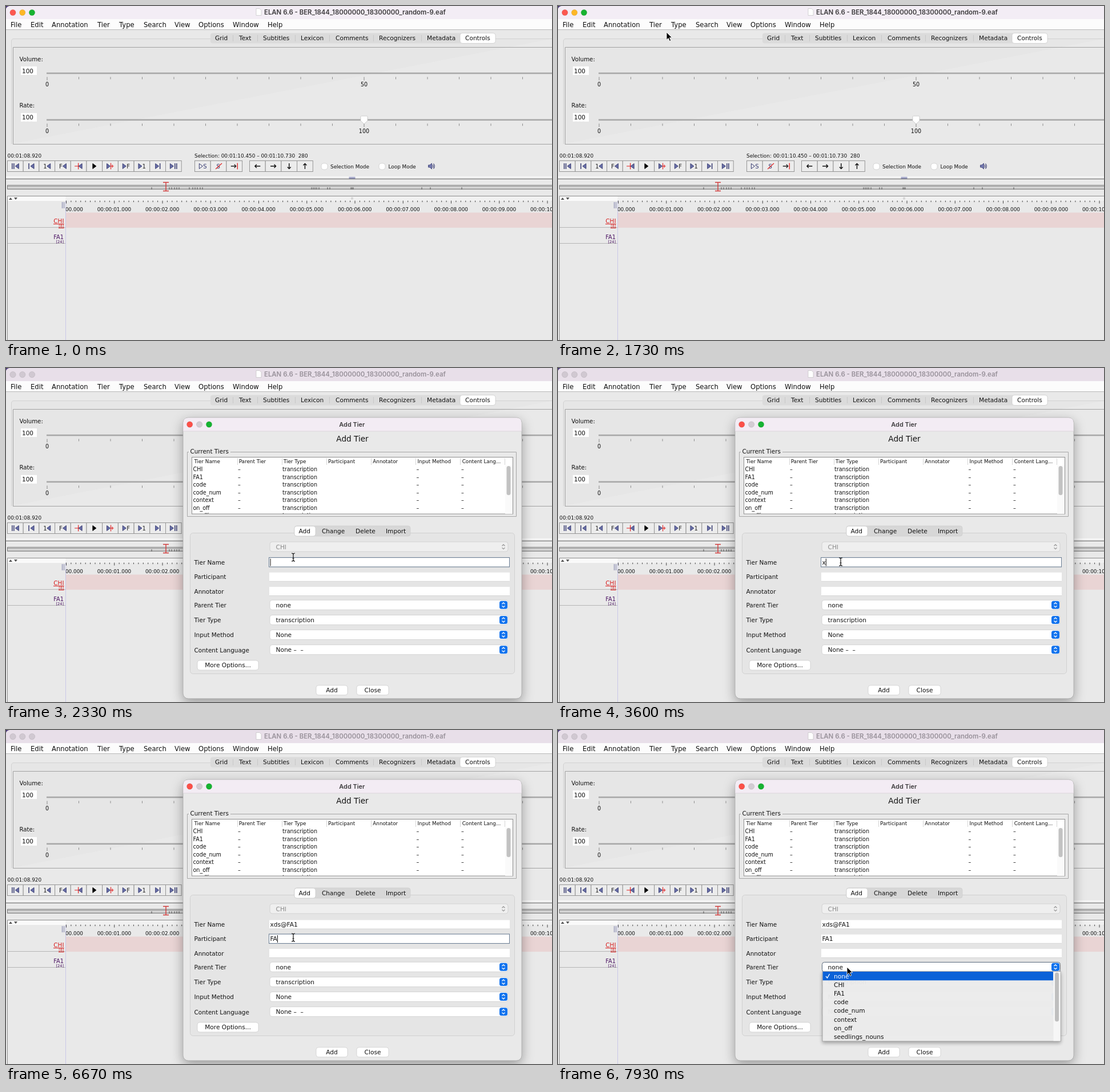
Write an HTML page that moves like this. It is 956 by 586 pixels and loops after 8 s.

```html
<!DOCTYPE html>
<html lang="en">
<head>
<meta charset="utf-8">
<title>Add a tier</title>
<style>
  html, body { margin: 0; width: 100%; height: 100%; overflow: hidden; background: #e9e9e9; }
  svg { display: block; width: 956px; height: 586px; }
  text { font-family: "DejaVu Sans", sans-serif; white-space: pre; }
  .title { font-family: Inter, Roboto, sans-serif; font-weight: 600; }
  .mid { text-anchor: middle; }
  .end { text-anchor: end; }

  .step, .step-move { animation: 8s step-end infinite; }
  .menu { animation-name: menu; }
  .hover { animation-name: hover; }
  .inactive { animation-name: inactive; }
  .dialog { animation-name: dialog; transform-origin: 606.5px 333.5px; filter: drop-shadow(0 7px 10px #0005); }
  .content { animation-name: content; }
  .popup { animation-name: popup; }
  .arrow { animation-name: arrow; }
  .beam { animation-name: beam; }
  .pointer { animation: pointer 8s ease-in-out infinite; }

  @keyframes menu { 0% { visibility: hidden } 13.375% { visibility: visible } 20.875%, to { visibility: hidden } }
  @keyframes hover { 0% { visibility: hidden } 15.85% { visibility: visible } 20.875%, to { visibility: hidden } }
  @keyframes inactive { 0% { visibility: hidden } 22.5%, to { visibility: visible } }
  @keyframes dialog {
    0% { visibility: hidden; transform: scale(.93); opacity: .7 }
    22.5% { visibility: visible; transform: scale(.93); opacity: .7 }
    23.375% { visibility: visible; transform: scale(.99); opacity: 1 }
    24.125%, to { visibility: visible; transform: none; opacity: 1 }
  }
  @keyframes content { 0% { visibility: hidden } 25%, to { visibility: visible } }
  @keyframes popup { 0% { visibility: hidden } 97.5%, to { visibility: visible } }
  @keyframes arrow {
    0% { visibility: hidden } 2.5% { visibility: visible }
    28.75% { visibility: hidden } 93.5%, to { visibility: visible }
  }
  @keyframes beam { 0% { visibility: hidden } 28.75% { visibility: visible } 93.5%, to { visibility: hidden } }
  @keyframes pointer {
    0%, 2.5% { transform: translate(948px, 398px) }
    12.5%, 13.375% { transform: translate(175px, 33px) }
    15.85%, 24.1% { transform: translate(190px, 46px) }
    29.125% { transform: translate(503px, 332px) }
    34.1%, 70.8% { transform: translate(495px, 340px) }
    77%, 91.6% { transform: translate(503px, 364px) }
    96%, to { transform: translate(506px, 416px) }
  }
</style>
</head>
<body>
<svg id="stage" viewBox="0 0 956 586"></svg>
<script>
const BLUE = '#0b62d8', NAVY = '#34386f', INK = '#111';

const text = (x, y, s, size = 10.6, attrs = '') =>
  `<text x="${x}" y="${y}" font-size="${size}" fill="${INK}" ${attrs}>${s}</text>`;
const fill = c => `style="fill:${c}"`;
const rect = (x, y, w, h, color, attrs = '') =>
  `<rect x="${x}" y="${y}" width="${w}" height="${h}" fill="${color}" ${attrs}/>`;
const path = (d, color, width = 1, inside = 'none') =>
  `<path d="${d}" stroke="${color}" stroke-width="${width}" fill="${inside}"/>`;
const pill = (x, y, w, h, color = '#fff') =>
  rect(x, y, w, h, color, 'rx="4" stroke="#c9c9c9" stroke-width=".7"');
const each = (n, f) => Array.from({ length: n }, (_, i) => f(i)).join('');
const group = (name, body) => `<g class="${name}">${body}</g>`;
const lights = (x, y, gap, colors) => colors.map((c, i) =>
  `<circle cx="${x + gap * i}" cy="${y}" r="5.2" fill="${c}" stroke="#0002" stroke-width=".6"/>`).join('');

// Main window

function titleBar(bg, colors, ink) {
  return rect(0, 0, 956, 23, bg) + path('M0 0V5Q1 1 6 0z', 'none', 0, '#4b3a78') +
    lights(12, 11.5, 16.75, colors) +
    path('M438 4.5h6l3 3v9h-9z', '#bbb', .6, '#fff') +
    text(452, 15, 'ELAN 6.6 - BER_1844_18000000_18300000_random-9.eaf', 11.4, `class="title" ${fill(ink)}`);
}

function menuBar() {
  const items = { File: 8, Edit: 43, Annotation: 80, Tier: 160, Type: 198, Search: 241, View: 295, Options: 337, Window: 397, Help: 458 };
  return rect(0, 23, 956, 18, '#fcfcfc') + rect(0, 41, 956, 1, '#b8b8b8') +
    Object.entries(items).map(([s, x]) => text(x, 36.8, s, 11.6)).join('');
}

function tabs() {
  const items = { Grid: 366, Text: 408, Subtitles: 450, Lexicon: 516, Comments: 577, Recognizers: 653, Metadata: 737 };
  return path('M956 57.5H14Q9.5 57.5 9.5 62V242', '#d2d2d2', 1, '#e6e6e6') +
    path('M12.5 242.5V72.5H956M12 242.5H956', '#a2a2a2') +
    rect(358, 47.5, 499, 18, '#dbdbdb', 'rx="4"') +
    [397, 440, 506, 566, 643, 727].map(x => rect(x, 51, 1, 11, '#c8c8c8')).join('') +
    Object.entries(items).map(([s, x]) => text(x, 60.3, s)).join('') +
    pill(795, 47.5, 62, 18) + text(804, 60.3, 'Controls');
}

function slider(y, label, middle) {
  return text(23.5, y - 21.5, label, 10.2) +
    rect(26, y - 12, 28, 15, '#fff') + text(28, y - .5, '100', 10.5) +
    rect(71, y - 1.3, 885, 2.6, '#a8a8a8') +
    each(16, i => rect(71.5 + 55.5 * i, y + 6.5, 1, i % 10 ? 4 : 6, '#8a8a8a')) +
    text(72, y + 23.3, '0', 9.6, 'class="mid"') + text(627, y + 23.3, middle, 9.6, 'class="mid"');
}

const triangle = (x, dir, color = '#696fa8', edge = NAVY) =>
  path(dir < 0 ? `M${x + 6} -4.5V4.5L${x} 0z` : `M${x} -4.5V4.5L${x + 6} 0z`, edge, .9, color);
const bar = (x, color = NAVY) => path(`M${x} -5V5`, color, 1.5);
const glyph = (x, s, color = '#222') => text(x, 3.8, s, 10, fill(color));

const transport = [
  bar(-5.5) + bar(-2.5) + triangle(0, -1),
  bar(-4) + triangle(-1, -1),
  glyph(-6.5, '1') + triangle(0, -1),
  glyph(-6.5, 'F') + triangle(0, -1),
  path('M-7 0H0M-.5 -5.5V5.5', '#e02020', 1.2) + triangle(0, -1),
  triangle(-3, 1, '#000', '#000'),
  triangle(-6, 1) + path('M1 -5.5V5.5M1 0H6M3.7 -2.5V2.5', '#e02020', 1.1),
  triangle(-6, 1) + glyph(1, 'F'),
  triangle(-6, 1) + glyph(.5, '1'),
  triangle(-4, 1) + bar(4),
  triangle(-6, 1) + bar(2.5) + bar(5.5)
];
const selection = [
  path('M-6 -4.5V4.5L0 0z', NAVY) + glyph(1, 'S', NAVY),
  glyph(-3.5, 'S', NAVY) + path('M-5 5L6 -5', '#e02020', 1.1),
  path('M-6 0H3M0 -3L3 0L0 3', '#222', 1.3) + path('M5.5 -5.5V5.5', '#e02020', 1.3)
];
const turns = [180, 0, 90, -90].map(a =>
  `<g transform="rotate(${a})">${path('M-5 0H4.5M1.5 -3L4.5 0L1.5 3', '#111', 1.4)}</g>`);

const buttons = (x, icons) => icons.map((icon, i) =>
  rect(x + 27.7 * i, 271.5, 27.7, 19, '#ececec', 'stroke="#959595"') +
  `<g transform="translate(${x + 13.85 + 27.7 * i} 281)">${icon}</g>`).join('');

function controls() {
  return text(2.5, 265.5, '00:01:08.920', 8.9) +
    text(330, 265.5, 'Selection: 00:01:10.450 – 00:01:10.730  280', 8.9) +
    buttons(2.5, transport) + buttons(330.5, selection) + buttons(426.5, turns) +
    pill(552, 276, 11, 11) + text(568, 284.8, 'Selection Mode', 8.9) +
    pill(653, 276, 11, 11) + text(669.5, 284.8, 'Loop Mode', 8.9) +
    path('M739.5 279h2.5l3.5-3v10l-3.5-3h-2.5z', NAVY, .8, '#7479b0') +
    path('M747 278.5q2 2.5 0 5M748.5 276.5q3.5 4.5 0 9', NAVY, 1.1);
}

function overview() {
  const marks = [255, 286, 290, 295, 299, 303, 321, 327, 331, 335, 340, 344, 535, 538, 541, 544, 548, 563, 567, 604, 606, 608, 728, 743, 798];
  return rect(0, 299, 956, 1.5, '#fafafa') + rect(0, 303, 956, 1, '#6a6a6a') +
    path('M600.5 300.5h11M600.5 302.5h11', '#6a6ea8') +
    path('M956 314.5H2.5V321.5H956M3 316.5H956', '#777') + path('M3 319.5H956', '#a0a0a0') +
    marks.map(x => rect(x - .5, 318, 1, 4, '#555')).join('') +
    path('M275 309.5h10M280 309.5v15M275 324.5h10', '#d03a3a', 1.4);
}

function timeline() {
  return path('M956 333.5H2.5V586', '#8c8c8c') +
    rect(3, 334, 953, 8, '#f1f1f1') + rect(3, 334, 101, 8, '#fafafa') +
    path('M5 340l3-4l3 4zM14 336l3 4l3-4z', 'none', 0, '#555') +
    '<circle cx="606" cy="337.5" r="2.2" fill="#d6d6d6"/>' +
    path('M98.5 344v11M101.5 344v11', '#777ba8') +
    rect(105, 362.5, 851, 26.5, '#e9d4d4') +
    each(102, i => rect(105 + 8.425 * i, 341.5, 1, i % 10 ? 2.6 : 5, '#444')) +
    `<g clip-path="url(#ruler)">${each(11, i => text(105.2 + 84.25 * i, 360, `00:00:${String(i).padStart(2, '0')}.000`, 8.9, 'class="mid"'))}</g>` +
    path('M3 388.5H104M3 416.5H104', '#b5b5b5') + rect(104, 342, 1, 244, '#c9c7e8') +
    text(101.5, 380.5, 'CHI', 10.4, `class="end" ${fill('#d81e1e')}`) +
    text(101.5, 388.3, '[8]', 6.6, `class="end" ${fill('#d81e1e')}`) + path('M83 382.5h18.5M92 389.5h9.5', '#d81e1e') +
    text(101, 408.5, 'FA1', 9.8, `class="end" ${fill('#4a1262')}`) +
    text(101, 415.5, '[24]', 6.6, `class="end" ${fill('#4a1262')}`);
}

function tierMenu() {
  const top = ['Add New Tier...', 'Change Tier Attributes...', 'Change Parent of Tier...', 'Delete Tier...', 'Import Tiers...', 'Participant'];
  const rest = ['Tokenize Tier...', 'Filter Tier...', 'Copy Tier...', 'Copy Annotations from Tier to Tier...', 'Merge Tiers...',
    'Merge Tiers...(Classic)', 'Merge Tier Group...', 'Modify Boundaries of All Annotations...', 'Create Annotations on Dependent Tiers...',
    'Create Annotations from Overlaps...', 'Create Annotations from Overlaps... (Classic)', 'Create Annotations from Subtraction...',
    'Create Annotations from Gaps...', 'Create Regular Annotations...', 'Remove Annotations or Values...',
    'Convert Annotation Values to Tiers...', 'Label and Number Annotations...', 'Change Case of Annotations...'];
  const list = (items, y) => items.map((s, i) => text(170, y + 16 * i, s, 11.45)).join('');
  const white = fill('#fff');
  return group('step menu',
    rect(152, 23, 38, 18.5, BLUE) + text(160, 36.8, 'Tier', 11.6, white) +
    rect(152.5, 42, 298, 400, '#fcfcfc', 'opacity=".97" stroke="#b5b5b5" stroke-width=".8" style="filter:drop-shadow(0 4px 5px #0005)"') +
    list(top, 57.7) + list(rest, 163.7) +
    text(437, 57.7, '⌘T', 11.4, 'class="end"') + text(437, 105.7, '⌥⌘T', 11.4, 'class="end"') +
    path('M435 129.5v8.5l8-4.2z', 'none', 0, '#333') + rect(153, 145, 297, 1, '#d6d6d6')) +
    group('step hover', rect(153, 46, 297, 16, BLUE) +
      text(170, 57.7, top[0], 11.45, white) + text(437, 57.7, '⌘T', 11.4, `class="end" ${white}`));
}

// Dialog

function tierTable() {
  const heads = ['Tier Name', 'Parent Tier', 'Tier Type', 'Participant', 'Annotator', 'Input Method', 'Content Lang...'];
  const names = ['CHI', 'FA1', 'code', 'code_num', 'context', 'on_off', 'seedlings_nouns'];
  return path('M320 147.5H317.5V260.5H893.5V147.5H393', '#a6a6a6') + text(322.5, 150.3, 'Current Tiers', 10.4) +
    rect(325.5, 156.5, 562, 99.5, '#fff', 'stroke="#8e8e8e"') +
    heads.map((s, i) => text(329.5 + 78.2 * i, 167.2, s, 8.8) + rect(405 + 78 * i, 158, 1, 12, '#d5d5d5')).join('') +
    `<g clip-path="url(#rows)">${names.map((s, i) => {
      const y = 181.4 + 13.45 * i;
      return text(327.5, y, s, 9.6) + text(484, y, 'transcription', 9.6) +
        [406, 718.5, 797].map(x => text(x, y, '–', 9.6)).join('');
    }).join('')}</g>` +
    rect(874, 171, 13, 85, '#fafafa') + rect(876.5, 172, 7, 51, '#c2c2c2', 'rx="3.5"');
}

const chevrons = (y, color) => path(`M868.5 ${y - 1.5}l2.5-2.5l2.5 2.5M868.5 ${y + 1.5}l2.5 2.5l2.5-2.5`, color, 1.3);
const combo = (y, s) => pill(462, y - 8.5, 417, 17) + text(472.5, y + 4, s) +
  rect(864, y - 7, 14, 14, '#1273ee', 'rx="3.5"') + chevrons(y, '#fff');
const button = (x, y, w, s) => pill(x, y - 8.5, w, 17) + text(x + w / 2, y + 3.8, s, 10.6, 'class="mid"');

function tierForm() {
  const labels = ['Tier Name', 'Participant', 'Annotator', 'Parent Tier', 'Tier Type', 'Input Method', 'Content Language'];
  const rows = [341, 366.3, 391.5, 416, 442.3, 468.3, 494.5];
  const choices = ['none', 'transcription', 'None', 'None –  –'];
  return rect(322.5, 289.5, 568, 247, '#e5e5e5', 'rx="5" stroke="#d0d0d0"') +
    rect(505, 277, 203, 18, '#d7d7d7', 'rx="4" stroke="#c9c9c9" stroke-width=".6"') + pill(505, 277.5, 37, 17.5) +
    text(512.5, 290, 'Add') + text(553, 290, 'Change', 10.5) + text(612, 290, 'Delete') + text(665, 290, 'Import') +
    pill(462, 305, 417, 17, '#efefef') + text(472.5, 318, 'CHI', 10.6, fill('#8a8a8a')) + chevrons(313.7, '#9a9a9a') +
    labels.map((s, i) => text(329.5, rows[i] + 4, s, 10.45)).join('') +
    rows.slice(0, 3).map(y => rect(461, y - 7.5, 421, 15.5, '#fff') + rect(461, y + 7.5, 421, .8, '#cfcfcf')).join('') +
    choices.map((s, i) => combo(rows[3 + i] - .3, s)).join('') +
    button(335, 521.5, 107, 'More Options...') + button(543, 565.3, 55, 'Add') + button(614, 565.3, 56, 'Close') +
    rect(460.5, 332.5, 421, 16.5, 'none', 'id="focus" stroke="#6b7f95"') +
    text(462.5, 345, '', 10.6, 'id="name"') + text(462.5, 370, '', 10.6, 'id="person"') +
    rect(0, 0, 1.1, 13, '#222', 'id="caret"');
}

function parentList() {
  const items = ['none', 'CHI', 'FA1', 'code', 'code_num', 'context', 'on_off', 'seedlings_nouns'];
  return group('step popup',
    rect(462.5, 407.5, 417, 17, 'none', 'rx="4" stroke="#5f6f82"') +
    rect(463, 423.5, 417, 122.5, '#ececec', 'opacity=".97" stroke="#9a9a9a" stroke-width=".8" style="filter:drop-shadow(0 3px 3px #0005)"') +
    rect(867.5, 424, 12, 121.5, '#f6f6f6') + rect(870, 425.5, 7, 86, '#bfbfbf', 'rx="3.5"') +
    rect(463.5, 424, 403.5, 15.3, BLUE) + path('M469 432l2.5 3l4-7', '#fff', 1.3) +
    items.map((s, i) => text(483, 436 + 15.1 * i, s, 10.6, i ? '' : fill('#fff'))).join(''));
}

function dialog() {
  return group('step dialog',
    rect(310, 87, 593, 493, '#e9e9e9', 'rx="9" stroke="#a9a9a9" stroke-width=".8"') +
    path('M310.4 111V96Q310.4 87.4 319 87.4H894Q902.6 87.4 902.6 96V111z', 'none', 0, '#f3ecf4') +
    rect(310.4, 110.5, 592.2, .8, '#d8d2d8') +
    lights(321.7, 99, 16.9, ['#fb5049', '#d3ccd3', '#17b332']) +
    text(605.8, 102.5, 'Add Tier', 10.9, `class="title mid" ${fill('#3c3a3c')}`)) +
    group('step content', text(606.5, 129.3, 'Add Tier', 13.6, 'class="mid"') + tierTable() + tierForm()) +
    parentList();
}

const pointer = group('pointer',
  group('step arrow', path('M0 0V13.5L3.2 10.6L5.4 15.6L7.7 14.6L5.5 9.7H9.7z', '#fff', .9, '#000')) +
  group('step beam', path('M-3 -7Q0 -7 0 -5Q0 -7 3 -7M0 -5V5M-3 7Q0 7 0 5Q0 7 3 7M-1.5 2H1.5', '#111', 1.2)));

document.getElementById('stage').innerHTML =
  '<clipPath id="ruler"><rect x="105" y="342" width="851" height="24"/></clipPath>' +
  '<clipPath id="rows"><rect x="326" y="170" width="548" height="86"/></clipPath>' +
  rect(0, 0, 956, 586, '#e9e9e9') +
  titleBar('#f3edf5', ['#fc5850', '#fdb726', '#18b331'], '#3c3a3c') +
  group('step inactive', titleBar('#e8dfe9', Array(3).fill('#d0c8d1'), '#98919a')) +
  menuBar() + tabs() + slider(118, 'Volume:', '50') + slider(199.8, 'Rate:', '100') +
  path('M621 194.5q0-1.5 1.5-1.5h9q1.5 0 1.5 1.5v7l-6 5.5l-6-5.5z', '#c4c4c4', .8, '#fff') +
  controls() + overview() + timeline() + tierMenu() + dialog() + pointer;

// Typing: [time in ms, active field, tier name, participant]
const keys = [
  [0, 0, '', ''], [2000, 0, '', ''], [3600, 0, 'x', ''], [3930, 0, 'xd', ''], [4070, 0, 'xds', ''], [4470, 0, 'xds@', ''],
  [5065, 0, 'xds@F', ''], [5130, 0, 'xds@FA', ''], [5470, 0, 'xds@FA1', ''], [6130, 1, 'xds@FA1', ''],
  [6530, 1, 'xds@FA1', 'F'], [6665, 1, 'xds@FA1', 'FA'], [7000, 1, 'xds@FA1', 'FA1'], [7700, 2, 'xds@FA1', 'FA1']
];
const [nameBox, personBox, caret, focusRing] =
  ['name', 'person', 'caret', 'focus'].map(id => document.getElementById(id));
let start;

function frame(now) {
  start ??= now;
  const t = (now - start) % 8000;
  const [since, field, name, person] = keys.findLast(k => k[0] <= t);
  nameBox.textContent = name;
  personBox.textContent = person;
  const box = field ? personBox : nameBox, y = field ? 358 : 332.5;
  const blinkOn = Math.floor((t - since) / 500) % 2 === 0;
  caret.setAttribute('x', 462.5 + box.getComputedTextLength());
  caret.setAttribute('y', y + 2);
  caret.style.opacity = field < 2 && blinkOn ? 1 : 0;
  focusRing.setAttribute('y', y);
  focusRing.style.opacity = field < 2 ? 1 : 0;
  requestAnimationFrame(frame);
}
requestAnimationFrame(frame);
</script>
</body>
</html>
```
